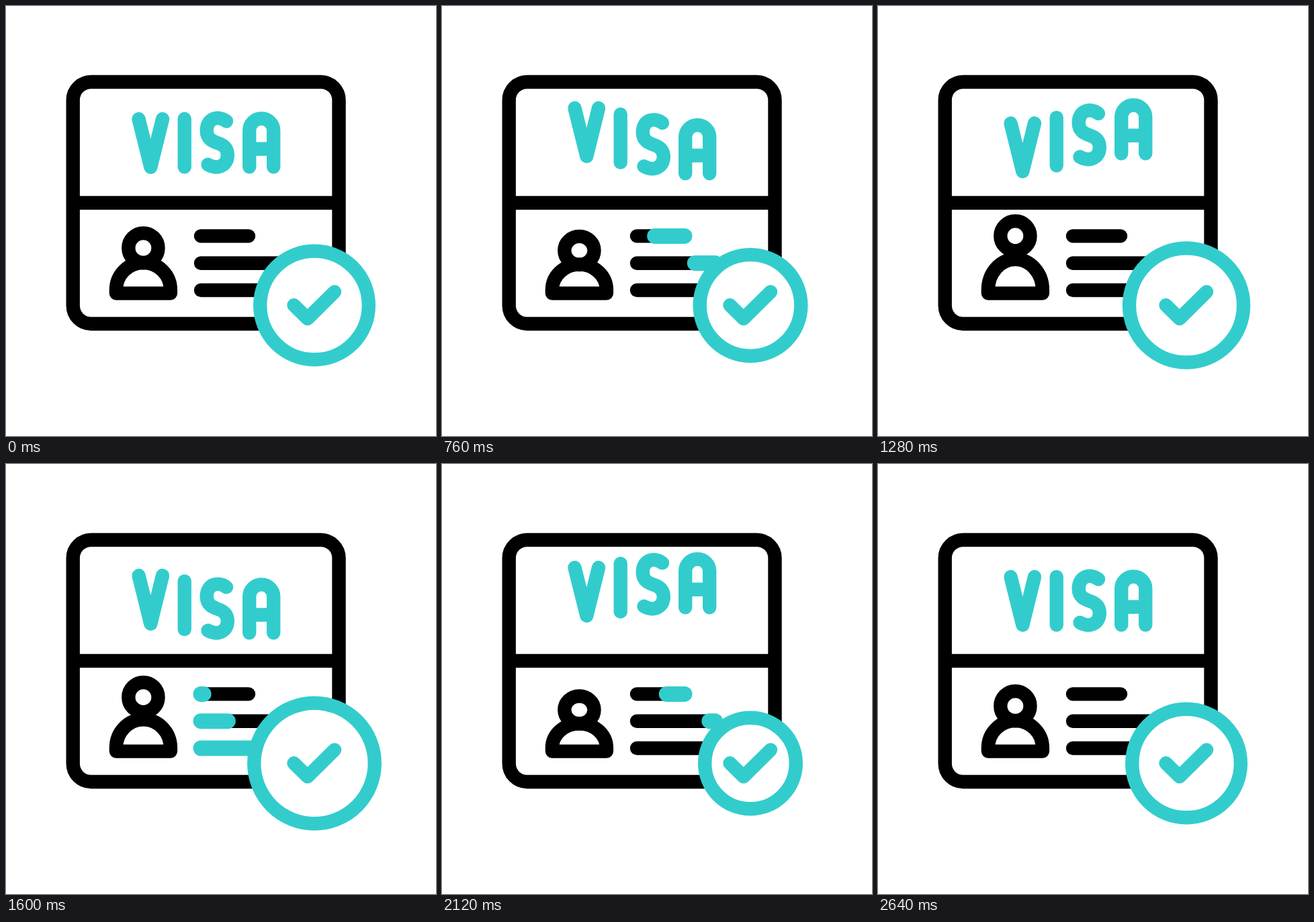
An HTML page with a canvas for the animation above (3000 ms loop, 640x640 px).

```html
<!DOCTYPE html>
<html lang="en">
<head>
<meta charset="utf-8">
<title>Visa approved</title>
<style>
  html, body { margin: 0; width: 100%; height: 100%; overflow: hidden; background: #fff; }
  canvas { display: block; width: 100vw; height: 100vh; }
</style>
</head>
<body>
<canvas id="stage" width="640" height="640"></canvas>
<script>
const ctx = document.getElementById('stage').getContext('2d');
const LOOP = 3000, STEP = 40;
const TEAL = '#33cccd', BLACK = '#000', WEIGHT = 20.4;

const clamp = x => Math.min(1, Math.max(0, x));
const ease = x => { x = clamp(x); return x * x * (3 - 2 * x); };

// Eased value at time t along [time, value] keys.
function track(keys, t) {
  let value = keys[0][1];
  for (let i = 1; i < keys.length; i++) {
    const [t0, v0] = keys[i - 1], [t1, v1] = keys[i];
    if (t >= t0) value = v0 + (v1 - v0) * ease((t - t0) / (t1 - t0));
  }
  return value;
}

function stroke(path, color = BLACK, width = WEIGHT) {
  ctx.strokeStyle = color;
  ctx.lineWidth = width;
  ctx.stroke(path);
}

const card = new Path2D('M99.7 293H495.5');
card.roundRect(99.7, 113, 395.8, 360, 27);

const letters = [
  'M197.5 168L215.3 239.6L233 168',
  'M265.7 168V239.5',
  'M328 171.5C317 162.5 298.7 166 298.7 185.5C298.7 198 308 201.5 314.5 203.8C323 206.5 329.8 211 329.8 222C329.8 239 313 243.5 300.5 236',
  'M362.2 239.5V185.5a18 18 0 0 1 36 0V239.5M362.2 212.7H398'
].map(d => new Path2D(d));

const tick = new Path2D('M428.5 445.3L448.8 465.3L489 425.5');

const letterKeys = [[-40, 0], [440, 12.6], [920, -26], [1400, 12.6], [1880, -26], [2380, 0]];
const headKeys = [[0, 0], [660, 5], [1380, -19.2], [2060, 6], [2640, 0]];
const bodyKeys = [[0, 0], [660, 3.2], [1300, -5], [2060, 4.5], [2640, 0]];
const badgeKeys = [[0, 91], [458, 104.7], [963, 75], [1472, 104.7], [1978, 75], [2490, 91]];

const lines = [
  { y: 342.4, end: 361, start: 250 },
  { y: 382.7, end: 406.5, start: 130 },
  { y: 423, end: 396, start: 10 }
];

function drawLetters(t) {
  letters.forEach((path, i) => {
    ctx.save();
    ctx.translate(0, track(letterKeys, t - i * 80));
    stroke(path, TEAL);
    ctx.restore();
  });
}

function drawPerson(t) {
  const headShift = track(headKeys, t);
  const squash = 0.28 * Math.max(0, headShift);
  const head = new Path2D();
  head.ellipse(204.4, 360.2 + headShift, 22.1, 22.1 - squash, 0, 0, Math.PI * 2);
  stroke(head);

  const body = new Path2D();
  body.moveTo(163.9, 427.6);
  body.ellipse(204.4, 422.5, 40.5, 40.5 - track(bodyKeys, t), 0, Math.PI, Math.PI * 2);
  body.lineTo(244.9, 427.6);
  body.closePath();
  stroke(body);
}

function drawLines(t) {
  const left = 290;
  const segment = (y, from, to) => new Path2D(`M${from} ${y}H${to}`);
  for (const { y, end, start } of lines) {
    stroke(segment(y, left, end));
    for (const cycle of [0, 1280]) {
      const age = t - start - cycle;
      const front = ease(age / 480), back = ease((age - 310) / 480);
      if (front > back) {
        const at = f => left + (end - left) * f;
        stroke(segment(y, at(back), at(front)), TEAL, 23);
      }
    }
  }
}

function drawBadge(t) {
  const ring = new Path2D();
  ring.arc(459, 445.5, track(badgeKeys, t) - WEIGHT / 2, 0, Math.PI * 2);
  ctx.fillStyle = '#fff';
  ctx.fill(ring);
  stroke(ring, TEAL);
  stroke(tick, TEAL);
}

function draw(now) {
  const t = Math.floor((now % LOOP) / STEP) * STEP;
  ctx.fillStyle = '#fff';
  ctx.fillRect(0, 0, 640, 640);
  ctx.lineCap = ctx.lineJoin = 'round';
  stroke(card);
  drawLetters(t);
  drawPerson(t);
  drawLines(t);
  drawBadge(t);
}

let origin;
function frame(now) {
  origin ??= now;
  draw(Math.max(0, now - origin));
  requestAnimationFrame(frame);
}
draw(0);
requestAnimationFrame(frame);
</script>
</body>
</html>
```
